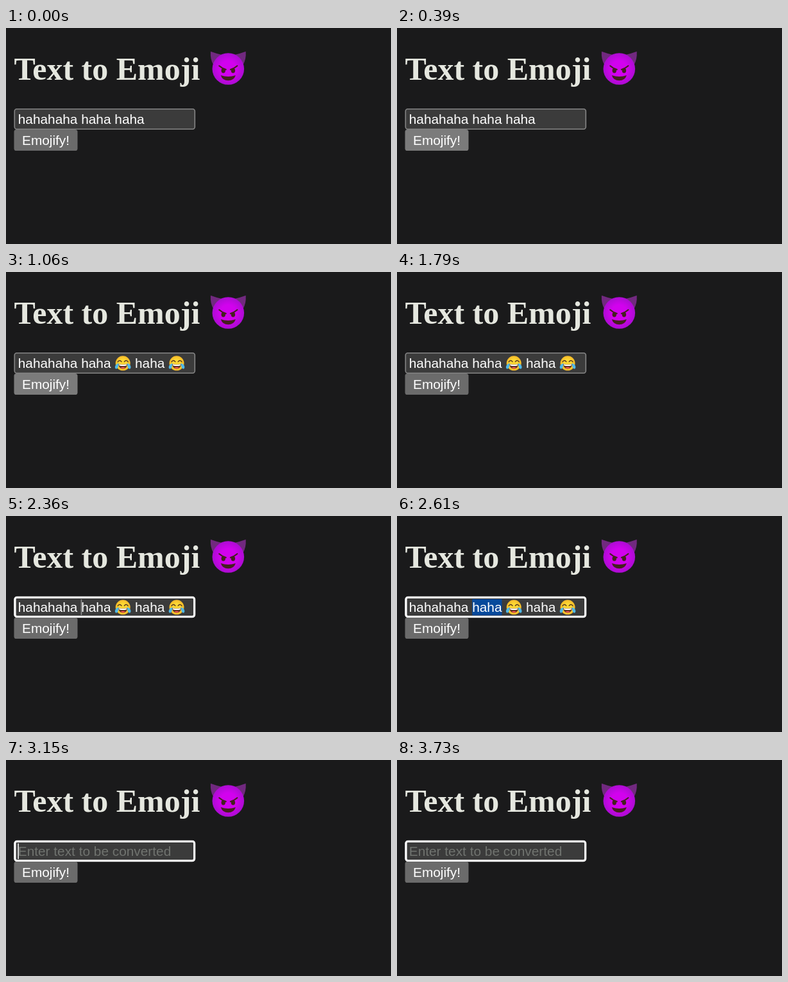
An HTML page that plays this animation: 600x338 px, repeating every 4120 ms.

```html
<!DOCTYPE html>
<html lang="en">
<head>
<meta charset="utf-8">
<title>Text to Emoji</title>
<style>
  html, body { margin: 0; width: 100%; height: 100%; overflow: hidden; background: #1a1a1b; }
  svg { display: block; width: 600px; height: 338px; }
  text { font: 20.833px "Liberation Sans", Arial, sans-serif; fill: #fff; }
  .title { font: bold 50px "Liberation Serif", "Times New Roman", serif; fill: #e5e7df; }
  .hint { fill: #70736f; }
</style>
</head>
<body>
<svg viewBox="0 0 600 338">
  <defs>
    <radialGradient id="purple">
      <stop offset=".5" stop-color="#d202ee"/>
      <stop offset="1" stop-color="#ac0cd2"/>
    </radialGradient>
    <radialGradient id="yellow">
      <stop offset=".5" stop-color="#fdd835"/>
      <stop offset="1" stop-color="#f5b928"/>
    </radialGradient>
    <g id="joy">
      <circle r="11.5" fill="url(#yellow)"/>
      <path d="M-7 1Q0 3 7 1Q6.6 8.6 0 8.6Q-6.6 8.6-7 1Z" fill="#5a2f22"/>
      <path d="M-6.2 1.4Q0 3 6.2 1.4L5.6 3.6Q0 4.8-5.6 3.6Z" fill="#fff"/>
      <path d="M-4 7.3Q0 4.6 4 7.3Q0 9.4-4 7.3Z" fill="#ef5350"/>
      <g id="side">
        <path d="M-8-2.2Q-5.2-6.4-2.2-2.4" fill="none" stroke="#5a3a22" stroke-width="1.5" stroke-linecap="round"/>
        <path d="M-6.6 0Q-11.5 1.4-12.3 5.4Q-12.5 9-9.8 8.8Q-7 8.4-6.6 0Z" fill="#4fb9e8"/>
      </g>
      <use href="#side" transform="scale(-1 1)"/>
    </g>
  </defs>

  <text class="title" x="12.5" y="81">Text to Emoji</text>
  <g transform="translate(346.3 64)">
    <g id="horn">
      <path d="M-27.4-27.2Q-19-24-9.5-22L-23-6Q-28.2-15-27.4-27.2Z" fill="#71297f"/>
    </g>
    <use href="#horn" transform="scale(-1 1)"/>
    <circle r="24.8" fill="url(#purple)"/>
    <g id="eye">
      <ellipse cx="-7.6" cy="2.6" rx="3.2" ry="3.9" fill="#45201f"/>
      <path d="M-14-4.8Q-10-1.2-3.6 1" fill="none" stroke="#45201f" stroke-width="2.2" stroke-linecap="round"/>
    </g>
    <use href="#eye" transform="scale(-1 1)"/>
    <path d="M-11.6 10Q0 14 11.6 10Q9 18.2 0 18.2Q-9 18.2-11.6 10Z" fill="#45201f"/>
  </g>

  <rect x="13.3" y="126.8" width="281" height="31.4" rx="3.4" fill="#3b3b3b"/>
  <rect id="border" x="13.3" y="126.8" width="281" height="31.4" rx="3.4" fill="none" stroke-width="1.6"/>
  <rect id="ring" x="14" y="127.4" width="279.6" height="30.2" rx="3" fill="none" stroke="#fff" stroke-width="3.2"/>
  <rect id="selection" y="130" height="25.5" fill="#06499b"/>
  <g id="plain"><text x="18.75" y="150">hahahaha haha haha</text></g>
  <g id="emojified">
    <text x="18.75" y="150">hahahaha haha</text>
    <text x="201" y="150">haha</text>
    <use href="#joy" x="182.2" y="142.8"/>
    <use href="#joy" x="266" y="142.8"/>
  </g>
  <path id="spelling" d="M19 153H111.5M117.2 153H163.5M201 153H247.3" stroke="#e0142c" stroke-width="1.8"/>
  <text id="hint" class="hint" x="18.75" y="150">Enter text to be converted</text>
  <rect id="caret" y="130.5" width="1.5" height="24.5" fill="#fff"/>

  <rect id="button" x="12.5" y="159" width="99" height="33" rx="3.6"/>
  <text x="25" y="183">Emojify!</text>
</svg>
<script>
  const LOOP = 4120;
  const el = id => document.getElementById(id);
  const set = (id, attrs) => {
    for (const key in attrs) el(id).setAttribute(key, attrs[key]);
  };
  const fade = (id, opacity) => set(id, { opacity: +opacity });

  function draw(t) {
    const within = (from, to) => t >= from && t < to;
    const focused = t >= 2360;
    const allSelected = t >= 2790;

    // pointer on the button, then on the field
    const pressed = within(820, 1060);
    const hovered = within(390, 1790);
    set('button', { fill: pressed ? '#616161' : hovered ? '#7b7b7b' : '#6b6b6b' });
    set('border', { stroke: t >= 1880 ? '#acacac' : '#858585' });
    fade('ring', focused);

    // field contents
    fade('plain', t < 1060);
    fade('emojified', within(1060, 3150));
    fade('hint', t >= 3150);

    // double click takes the word, triple click the line
    set('selection', {
      x: allSelected ? 18.75 : 117.2,
      width: allSelected ? 260.5 : 46.3,
      opacity: within(2610, 3150) ? 1 : within(2580, 2610) ? 0.5 : 0
    });
    fade('spelling', within(2850, 3150));

    set('caret', {
      x: t < 3150 ? 116.7 : 18.4,
      opacity: within(2360, 2390) ? 0.45 : within(2390, 2580) || within(3150, 3730) ? 1 : 0
    });
  }

  const start = performance.now();
  function tick() {
    draw((performance.now() - start) % LOOP);
    requestAnimationFrame(tick);
  }
  tick();
</script>
</body>
</html>
```
